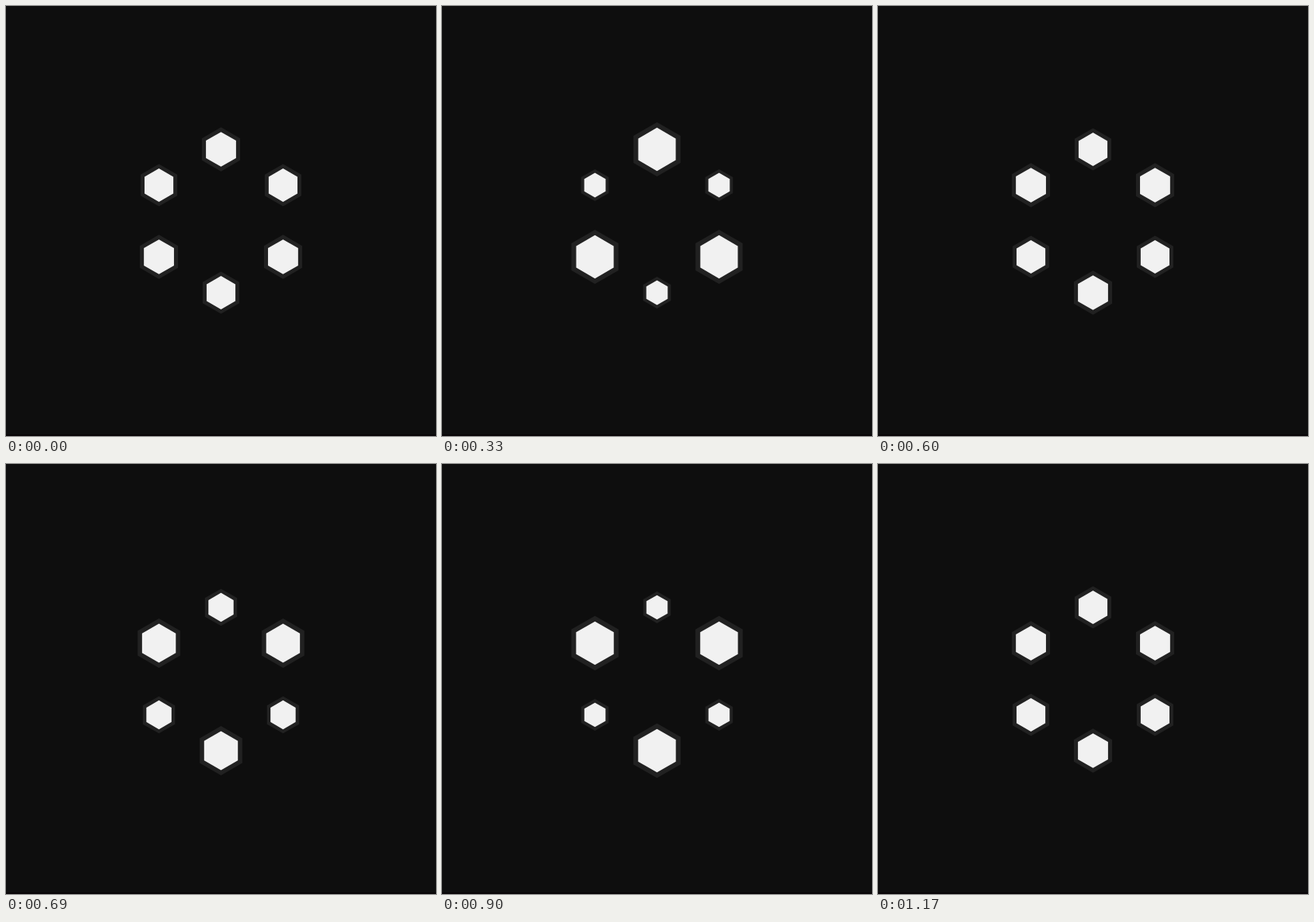
An HTML page with a canvas for the animation above (1200 ms loop, 540x540 px).

```html
<!DOCTYPE html>
<html lang="en">
<head>
<meta charset="utf-8">
<title>Hexagon loader</title>
<style>
  html, body { margin: 0; height: 100%; overflow: hidden; background: #0e0e0e; }
  canvas { display: block; }
</style>
</head>
<body>
<canvas id="stage" width="540" height="540"></canvas>
<script>
const ctx = document.getElementById('stage').getContext('2d');
const LOOP = 1200, STEP = 30, CENTER = 270, RING = 90;
const MEAN_RADIUS = 21.35, SWING = 6;

// Point on a circle, angle counted in sixths of a turn from the top.
function corner(x, y, radius, i) {
  const angle = i * Math.PI / 3;
  return [x + radius * Math.sin(angle), y - radius * Math.cos(angle)];
}

function hexagon(x, y, radius, color) {
  ctx.beginPath();
  for (let i = 0; i < 6; i++) ctx.lineTo(...corner(x, y, radius, i));
  ctx.fillStyle = color;
  ctx.fill();
}

function draw(now) {
  const time = Math.floor(now % LOOP / STEP) * STEP + STEP / 2;
  const wave = SWING * Math.sin(2 * Math.PI * time / LOOP);

  ctx.fillStyle = '#0e0e0e';
  ctx.fillRect(0, 0, 540, 540);
  ctx.fillStyle = '#090608';
  ctx.fillRect(0, 538, 540, 2);

  for (let i = 0; i < 6; i++) {
    const [x, y] = corner(CENTER, CENTER, RING, i);
    const radius = MEAN_RADIUS + (i % 2 ? -wave : wave);
    hexagon(x, y, radius * 1.2 + 1.5, '#212121');
    hexagon(x, y, radius, '#f1f1f1');
  }
}

const start = performance.now();
function tick() {
  draw(performance.now() - start);
  requestAnimationFrame(tick);
}
tick();
</script>
</body>
</html>
```
